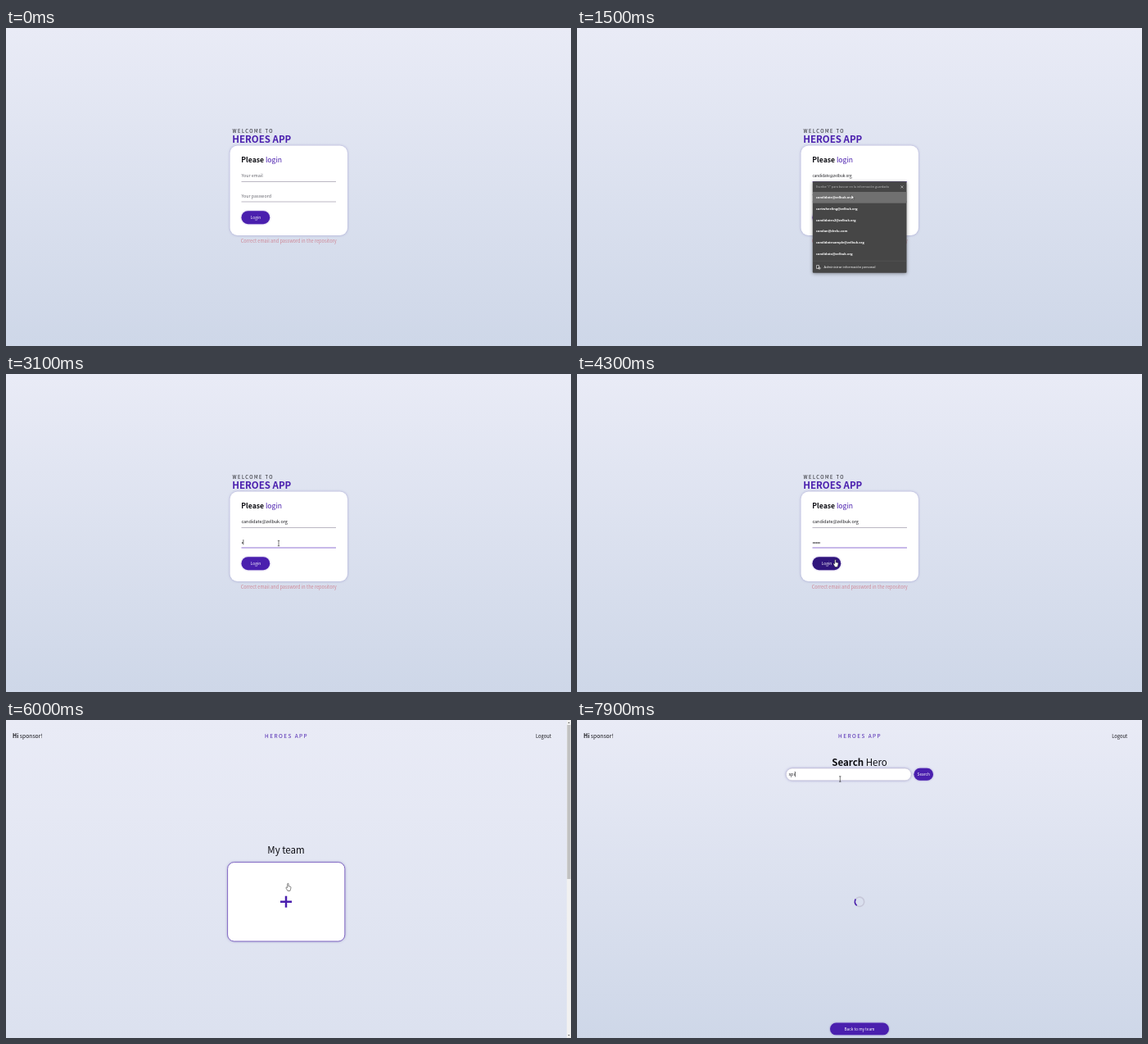
An HTML page that plays this animation: 690x388 px, repeating every 8 s.

```html
<!DOCTYPE html>
<html lang="en">
<head>
<meta charset="utf-8">
<title>Heroes App</title>
<style>
  html, body { margin: 0; width: 100%; height: 100%; overflow: hidden; background: #dce2ef; }
  svg { display: block; width: 100vw; height: 100vh; }
  text { font: 5.39px "Noto Sans CJK JP", "Noto Sans CJK SC", "Noto Sans CJK", sans-serif; fill: #17171c; white-space: pre; }
  .bold { font-weight: 700; }
  .mid { text-anchor: middle; }
  .hint { fill: #66666e; }
  .spaced { font-size: 5.75px; letter-spacing: 1.44px; }
  .brand { font-size: 6.47px; fill: #4a1fae; letter-spacing: 1.44px; text-anchor: middle; }
  .h1 { font-size: 11.5px; fill: #0c0c12; }
  .h2 { font-size: 8.62px; fill: #0c0c12; }
  .btn { font-size: 4.79px; font-weight: 500; fill: #fff; text-anchor: middle; }
  .pill { fill: #4a1fae; filter: drop-shadow(0 .5px 1px #4a1fae70); }
  .box { fill: #fff; filter: drop-shadow(0 .5px 1.8px #6a5fb080); }
  .menu text, .status { font-family: "Open Sans", sans-serif; font-size: 4px; fill: #fff; }
  .menu .item { font-weight: 700; }
  .menu .tip { font-size: 3.75px; fill: #bdbdbd; }
</style>
</head>
<body>
<svg viewBox="0 0 690 388" preserveAspectRatio="none">
  <defs>
    <linearGradient id="sky" x1="0" y1="0" x2="0" y2="1">
      <stop offset="0" stop-color="#e9ebf6"/>
      <stop offset="1" stop-color="#ced7e8"/>
    </linearGradient>
  </defs>
  <rect id="backdrop" width="690" height="388" fill="url(#sky)"/>

  <g id="loginPage">
    <text class="spaced" x="276.6" y="128.3">WELCOME TO</text>
    <text class="h1 bold" x="276.2" y="140.2" style="fill:#4a1fae">HEROES APP</text>
    <rect class="box" x="273.5" y="143.5" width="143.5" height="109.5" rx="9"/>
    <text class="h2" x="287.3" y="164.2"><tspan class="bold">Please</tspan><tspan fill="#4a1fae"> login</tspan></text>
    <text id="email" x="287.4" y="182.4"></text>
    <text id="password" x="287.4" y="207.2"></text>
    <g id="dots" fill="#17171c"></g>
    <rect id="emailLine" x="287.5" y="187" width="115.5" height=".8"/>
    <rect id="passwordLine" x="287.5" y="211.6" width="115.5" height=".8"/>
    <rect id="loginButton" class="pill" x="287.5" y="223.2" width="34.7" height="16" rx="8"/>
    <text class="btn" x="304.9" y="232.9">Login</text>
    <text x="286.8" y="261.8" style="font-size:5.6px;font-weight:300;fill:#cf8796">Correct email and password in the repository</text>
    <g id="menu" class="menu">
      <rect x="287.8" y="187.2" width="114.7" height="111.6" rx="1" fill="#464646" style="filter:drop-shadow(0 1px 2px #0006)"/>
      <rect id="hoverRow" x="288" y="200" width="114.3" height="13.7" fill="#707070"/>
      <text class="tip" x="292" y="195.4">Escribe "/" para buscar en la información guardada</text>
      <path d="M395.4 192.4l3 3m0-3l-3 3" stroke="#ddd" stroke-width=".6"/>
      <path d="M288 284.3h114.3" stroke="#5c5c5c" stroke-width=".5"/>
      <g id="items"></g>
      <path d="M292.5 289.5h3v4h-3zM295 292h2v2h-2z" fill="none" stroke="#eee" stroke-width=".6"/>
      <text x="301.6" y="293.2">Administrar información personal</text>
    </g>
  </g>

  <g id="teamPage">
    <text x="8" y="22.4" style="font-size:6.8px"><tspan class="bold">Hi</tspan> sponsor!</text>
    <text class="brand" x="342.6" y="22.3">HEROES APP</text>
    <text x="647" y="22" style="font-size:5.75px">Logout</text>
    <text class="h1 mid" x="342" y="162.6" style="font-weight:500">My team</text>
    <rect class="box" x="270.6" y="173.6" width="143.2" height="96.4" rx="8" stroke="#6a4bb8" stroke-width=".8"/>
    <path d="M335 221.8h14m-7-7v14" stroke="#4a1fae" stroke-width="2.5"/>
    <rect x="684.8" width="5.2" height="388" fill="#f1f1f1"/>
    <rect x="685.3" y="6" width="4.2" height="188" fill="#c1c1c1"/>
    <path d="M686.2 4l1.2-1.6 1.2 1.6zM686.2 384l1.2 1.6 1.2-1.6z" fill="#555"/>
    <g id="status">
      <path d="M0 380.4h118a1.5 1.5 0 0 1 1.5 1.5V388H0z" fill="#1f2b40"/>
      <text class="status" x="2" y="385.7">https://lumarvendo483.zelbuk.example/demo-tasks/#/search</text>
    </g>
  </g>

  <g id="searchPage">
    <text x="8" y="22.4" style="font-size:6.8px"><tspan class="bold">Hi</tspan> sponsor!</text>
    <text class="brand" x="345.6" y="22.3">HEROES APP</text>
    <text x="653.3" y="22" style="font-size:5.75px">Logout</text>
    <text class="h1 mid" x="345" y="55.6"><tspan class="bold">Search</tspan> Hero</text>
    <rect class="box" x="255.3" y="59" width="152.8" height="14.8" rx="7.4" stroke="#c3c2d4" stroke-width=".6"/>
    <text id="query" x="258.6" y="68"></text>
    <rect class="pill" x="411.4" y="58.8" width="23.6" height="15" rx="7.5"/>
    <text class="btn" x="423.2" y="68.2">Search</text>
    <g id="spinner" fill="none" stroke-width="1.6">
      <circle r="5.7" stroke="#c6c7d8"/>
      <path d="M-4.03-4.03A5.7 5.7 0 0 0-4.03 4.03" stroke="#4a1fae"/>
    </g>
    <rect class="pill" x="309" y="369.5" width="72" height="14.8" rx="7.4"/>
    <text class="btn" x="345" y="378.8">Back to my team</text>
  </g>

  <rect id="caret" width=".6" height="6.4" fill="#111"/>

  <g id="pointer" stroke-linejoin="round">
    <path id="arrow" d="M0 0v5.6l1.3-1.2.9 2 .9-.4-.9-1.9h1.7z" fill="#fff" stroke="#222" stroke-width=".5"/>
    <path id="beam" d="M-1.2-3.2h2.4M0-3.2v6.4M-1.2 3.2h2.4" fill="none" stroke="#222" stroke-width=".6"/>
    <path id="hand" d="M-.7 5V.6a.7.7 0 0 1 1.4 0v2.7l2.2.5q.8.2.7 1l-.5 2.5-.6 1.7H-.4L-2.4 5.6q-.3-.9.5-1z" fill="#fff" stroke="#222" stroke-width=".55"/>
  </g>
</svg>

<script>
const LOOP = 8000;
const EMAIL = "candidate@zelbuk.org";
const OPEN = 1100, PREVIEW = 1300, PICK = 2300;
const PASSWORD_FOCUS = 2900, TEAM = 4400, SEARCH = 6400;
const passwordKeys = [3100, 3200, 3300, 3400, 3500];
const queryKeys = [7500, 7700, 7800];

// [time, x, y]
const route = [
  [0, 700, 235], [500, 405, 165], [900, 330, 182], [1100, 330, 182],
  [1400, 335, 203.5], [1800, 335, 203.5], [2300, 333, 206.5], [3600, 333, 206.5],
  [4100, 315.5, 226.5], [4400, 315.5, 226.5], [4700, 316, 219.5], [5000, 316, 219.5],
  [5700, 344.4, 199.5], [6500, 344.4, 199.5], [7000, 321.3, 72], [LOOP, 321.3, 72]
];
// [start time, pointer shape]
const shapes = [[0, "arrow"], [750, "beam"], [1150, "arrow"], [2550, "beam"],
  [3800, "arrow"], [4000, "hand"], [6450, "arrow"], [6950, "beam"]];

const $ = id => document.getElementById(id);
const show = (id, on) => $(id).style.display = on ? "" : "none";
const clamp = v => Math.max(0, Math.min(1, v));
const between = (t, a, b) => t >= a && t < b;
const pressed = (keys, t) => keys.filter(k => t >= k).length;

$("items").innerHTML = [EMAIL, "cartwheeling@zelbuk.org", "candidates2@zelbuk.org",
  "candan@drelu.com", "candidatesample@zelbuk.org", "candidato@zelbuk.org"]
  .map((s, i) => `<text class="item" x="292" y="${208.3 + i * 13.65}">${s}</text>`).join("");
$("dots").innerHTML = passwordKeys
  .map((_, i) => `<circle cx="${288.7 + i * 1.85}" cy="206" r=".8"/>`).join("");

function setText(id, value, hint) {
  const el = $(id);
  const text = value || hint;
  if (el.textContent !== text) el.textContent = text;
  el.classList.toggle("hint", !value);
  return el;
}

function drawPointer(t) {
  const i = route.findIndex(([time]) => time > t);
  const [t0, x0, y0] = route[i - 1], [t1, x1, y1] = route[i];
  const p = (t - t0) / (t1 - t0), e = p * p * (3 - 2 * p);
  $("pointer").setAttribute("transform", `translate(${x0 + (x1 - x0) * e} ${y0 + (y1 - y0) * e})`);
  const current = shapes.filter(([time]) => time <= t).pop()[1];
  for (const id of ["arrow", "beam", "hand"]) show(id, id === current);
}

function drawLogin(t) {
  const typed = pressed(passwordKeys, t);
  const email = setText("email", t >= PREVIEW ? EMAIL : "", "Your email");
  email.style.fontSize = between(t, PREVIEW, PICK) ? "4.6px" : "";
  setText("password", "", typed ? "" : "Your password");
  [...$("dots").children].forEach((dot, i) => dot.setAttribute("opacity", i < typed ? 1 : 0));

  const line = on => on ? "#7550c8" : "#aaa6b4";
  $("emailLine").setAttribute("fill", line(between(t, 900, PASSWORD_FOCUS)));
  $("passwordLine").setAttribute("fill", line(t >= PASSWORD_FOCUS));
  $("loginButton").style.fill = t >= 4000 ? "#30157c" : "";

  const closing = clamp((t - PICK) / 200);
  const scale = 1 - .06 * closing;
  show("menu", between(t, OPEN, PICK + 200));
  $("menu").setAttribute("opacity", clamp((t - OPEN) / 150) * (1 - closing) ** 1.25);
  $("menu").setAttribute("transform", `translate(345 243) scale(${scale}) translate(-345 -243)`);
  show("hoverRow", t >= PREVIEW);
}

function drawCaret(t) {
  let x = 287.4, y = 177.2, since = 900;
  if (t >= SEARCH) {
    since = Math.max(6950, ...queryKeys.filter(k => t >= k));
    x = 258.8 + (t >= queryKeys[0] ? $("query").getComputedTextLength() : 0);
    y = 63;
  } else if (t >= PASSWORD_FOCUS) {
    since = Math.max(PASSWORD_FOCUS, ...passwordKeys.filter(k => t >= k));
    x = 287.7 + pressed(passwordKeys, t) * 1.9;
    y = 202;
  } else if (t >= PICK) {
    since = PICK;
    x = 287.5 + $("email").getComputedTextLength();
  }
  const hidden = between(t, PREVIEW, PICK) || between(t, TEAM, SEARCH);
  show("caret", !hidden && t >= since && (t - since) % 1000 < 500);
  $("caret").setAttribute("x", x);
  $("caret").setAttribute("y", y);
}

function draw(t) {
  show("loginPage", t < TEAM);
  show("teamPage", between(t, TEAM, SEARCH));
  show("searchPage", t >= SEARCH);
  // The team page is twice as tall as the view.
  $("backdrop").setAttribute("height", between(t, TEAM, SEARCH) ? 776 : 388);
  show("status", between(t, 4600, 5200));
  drawLogin(t);
  setText("query", "spi".slice(0, pressed(queryKeys, t)), "");
  show("spinner", t >= 7600);
  $("spinner").setAttribute("transform", `translate(345 221.8) rotate(${(t - 7900) * .36 - 10})`);
  drawCaret(t);
  drawPointer(t);
}

const start = performance.now();
function tick() {
  draw((performance.now() - start) % LOOP);
  requestAnimationFrame(tick);
}
tick();
</script>
</body>
</html>
```
